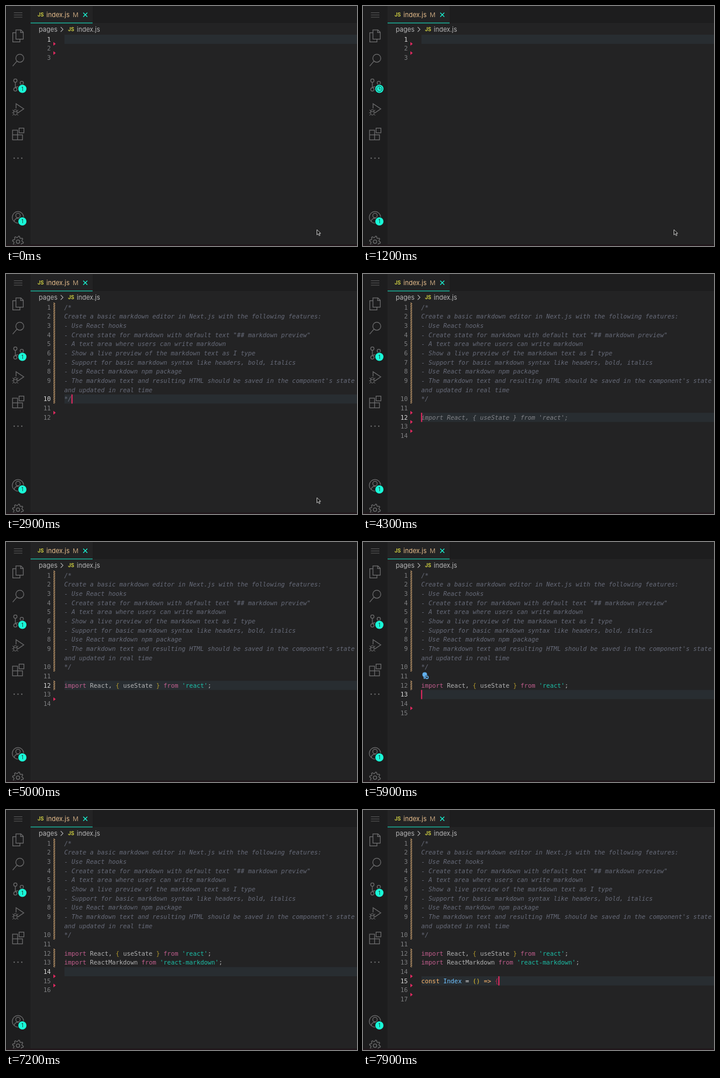
Animation, 600 px wide and 410 px high, one loop 8 s. Source, as an HTML page with a canvas:

```html
<!DOCTYPE html>
<html lang="en">
<head>
<meta charset="utf-8">
<title>Code editor</title>
<style>
html, body { margin: 0; width: 100%; height: 100%; overflow: hidden; background: #232324; }
canvas { display: block; width: 600px; height: 410px; }
</style>
</head>
<body>
<canvas id="stage"></canvas>
<script>
const W = 600, H = 410, LOOP = 8000, BLINK = 305;
const TOP = 49, ROW = 15.67, LEFT = 99.5, CHAR = 6.29;
const MONO = '10.45px "DejaVu Sans Mono", "Liberation Mono", monospace';
const UI = 'Inter, "Open Sans", sans-serif';
const C = {
  editor: '#232324', side: '#1d1d1e', current: '#282d31', teal: '#19f9d8',
  pink: '#ff75b5', blue: '#6fc1ff', orange: '#ffb86c', gold: '#e8c52e',
  text: '#e6e6e6', comment: '#676b79', ghost: '#808287', red: '#e02a60',
  icon: '#6c6c6d', peach: '#e6bd8c', error: '#b82450'
};

const comment = [
  '/*',
  'Create a basic markdown editor in Next.js with the following features:',
  '- Use React hooks',
  '- Create state for markdown with default text "## markdown preview"',
  '- A text area where users can write markdown',
  '- Show a live preview of the markdown text as I type',
  '- Support for basic markdown syntax like headers, bold, italics',
  '- Use React markdown npm package',
  "- The markdown text and resulting HTML should be saved in the component's state",
  'and updated in real time',
  '*/'
];
const code = {
  12: [['pink', 'import'], ['text', ' React, '], ['gold', '{'], ['text', ' useState '], ['gold', '}'],
    ['pink', ' from '], ['teal', "'react'"], ['text', ';']],
  13: [['pink', 'import'], ['text', ' ReactMarkdown '], ['pink', 'from '], ['teal', "'react-markdown'"], ['text', ';']],
  15: [['orange', 'const '], ['blue', 'Index'], ['text', ' = '], ['gold', '()'], ['orange', ' => '], ['error', '{']]
};

// Each step overrides part of the state; "key" restarts the caret blink.
const steps = [
  [0, { line: 1, col: 0, key: 90, done: 0, ghost: 0, faded: 0, marks: [1, 2], bars: [], mouse: true }],
  [1000, { clock: true }],
  [1385, { line: 10, col: 2, key: 1385, done: 10, marks: [10, 11] }],
  [1500, { bars: [[1, 10]], marks: [11] }],
  [1700, { clock: false }],
  [3000, { line: 11, col: 0, key: 3000, marks: [11, 12], mouse: false }],
  [3500, { line: 12, key: 3500, marks: [11, 12, 13] }],
  [3750, { ghost: 12 }],
  [4500, { ghost: 0, done: 12, col: 40, key: 4500 }],
  [4700, { bars: [[1, 10], [12, 12]], marks: [13] }],
  [4900, { faded: 12 }],
  [5200, { line: 13, col: 0, key: 5200, marks: [14] }],
  [5500, { bulb: true }],
  [6000, { bulb: false }],
  [6100, { ghost: 13 }],
  [6300, { ghost: 0, done: 13, col: 43, key: 6300 }],
  [6450, { bars: [[1, 10], [12, 13]] }],
  [6700, { faded: 13 }],
  [6850, { line: 14, col: 0, key: 6850, marks: [14, 15] }],
  [7300, { line: 15, key: 7300, marks: [14, 15, 16] }],
  [7500, { ghost: 15 }],
  [7800, { ghost: 0, done: 15, col: 21, key: 7800 }]
];

const canvas = document.getElementById('stage');
const g = canvas.getContext('2d');
const dpr = window.devicePixelRatio || 1;
canvas.width = W * dpr;
canvas.height = H * dpr;

function stateAt(t) {
  const s = {};
  for (const [at, change] of steps) if (t >= at) Object.assign(s, change);
  return s;
}

function rect(x, y, w, h, color) {
  g.fillStyle = color;
  g.fillRect(x, y, w, h);
}

function write(str, x, y, font, color, align = 'left') {
  g.font = font;
  g.fillStyle = color;
  g.textAlign = align;
  g.fillText(str, x, y);
}

function stroke(d, color = C.icon, width = 1.25) {
  g.strokeStyle = color;
  g.lineWidth = width;
  g.stroke(new Path2D(d));
}

function disc(x, y, r, color) {
  g.fillStyle = color;
  g.beginPath();
  g.arc(x, y, r, 0, 7);
  g.fill();
}

function ring(x, y, r, color = C.icon, width = 1.25) {
  g.strokeStyle = color;
  g.lineWidth = width;
  g.beginPath();
  g.arc(x, y, r, 0, 7);
  g.stroke();
}

// Line 9 wraps, so everything below it sits one row lower.
const rowTop = line => TOP + (line < 10 ? line - 1 : line) * ROW;

function badge(y, clock) {
  disc(28, y, 8, C.side);
  disc(28, y, 7, C.teal);
  if (clock) {
    ring(28, y, 4.6, '#174a44', 1);
    stroke(`M28 ${y - 3}V${y + .3}H30.6`, '#174a44', 1);
  } else write('1', 28, y + 3, '8.5px ' + UI, '#20302f', 'center');
}

function gear(x, y) {
  g.beginPath();
  for (let i = 0; i < 32; i++) {
    const a = (i + .5) * Math.PI / 16;
    const r = i % 4 < 2 ? 9.3 : 7;
    g.lineTo(x + r * Math.cos(a), y + r * Math.sin(a));
  }
  g.closePath();
  g.strokeStyle = C.icon;
  g.lineWidth = 1.25;
  g.stroke();
  ring(x, y, 3);
}

function sidebar(s) {
  rect(0, 0, 42, H, C.side);
  rect(0, 0, 1, H, '#161617');
  stroke('M13.5 11.5H28M13.5 15.3H28M13.5 19.1H28', '#59595a', 1);
  stroke('M17 40.8H25.5L29.5 44.8V56.5H17ZM25 41V45.3H29.3M17 45.5H11.6V61.3H23.8V56.7');
  ring(23.6, 89.2, 6.8);
  stroke('M18.8 94.2L11.5 102.6');
  ring(16, 127.5, 2.8);
  ring(16, 142.5, 2.8);
  ring(27, 131.3, 2.8);
  stroke('M16 130.5V139.5M27 134.3Q26.5 138 22 138H19Q16 138 16 140');
  badge(141.5, s.clock);
  stroke('M17.2 175V167L30.4 175.8L20.8 182.3');
  stroke('M13 180.5Q13 177 16 177T19 180.5V183Q19 186.3 16 186.3T13 183ZM13 180.5H19M11 177.5L13.2 179.5M21 177.5L18.8 179.5M10.5 182.5H13M19 182.5H21.5M11 187L13.3 184.8M21 187L18.7 184.8', C.icon, 1);
  stroke('M11.2 212H19.8V228.6H11.2ZM11.2 220.2H28.2V228.6H19.8M28.2 220.2V228.6M22.4 208.6H30.6V216.6H22.4Z');
  for (const x of [14, 20.5, 27]) disc(x, 260, 1.15, C.icon);
  ring(20.5, 361, 9.8);
  ring(20.5, 358, 3.8);
  stroke('M14 368Q15 362.6 20.5 362.6T27 368');
  badge(368, false);
  gear(20.5, 402.5);
}

function header() {
  rect(42, 0, 558, 29, C.side);
  rect(42, 0, 106, 29, C.editor);
  rect(42, 28.4, 106, 1.2, '#18c9af');
  const ui = '11px ' + UI, js = 'bold 8.5px ' + UI;
  write('JS', 54, 18, js, '#cbcb41');
  write('index.js', 69, 19, ui, C.peach);
  write('M', 114, 19, ui, '#b89a77');
  stroke('M132 11.5L139 18.5M139 11.5L132 18.5', C.teal, 1.1);
  write('pages', 56, 44, ui, '#b5b5b6');
  stroke('M93.5 36L97.5 40L93.5 44', '#a5a5a6', 1.1);
  write('JS', 106, 43, js, '#cbcb41');
  write('index.js', 121, 44, ui, '#b5b5b6');
}

function gutter(s) {
  for (let n = 1; n <= s.line + 2; n++) {
    // Wrapping only exists once the comment is in place.
    write(n, 76.6, rowTop(n) + 11.7, MONO, n === s.line ? '#d8d8d8' : '#7d7e80', 'right');
  }
  for (const [from, to] of s.bars) {
    const y = rowTop(from), end = rowTop(to + 1);
    g.save();
    g.beginPath();
    g.rect(81, y, 3, end - y);
    g.clip();
    g.strokeStyle = '#dcae78';
    g.lineWidth = 1.2;
    g.beginPath();
    for (let v = y - 4; v < end; v += 3) {
      g.moveTo(80, v);
      g.lineTo(85, v + 4);
    }
    g.stroke();
    g.restore();
  }
  g.fillStyle = C.red;
  for (const n of s.marks) {
    const y = rowTop(n + 1);
    g.fill(new Path2D(`M81 ${y - 3.2}L85 ${y}L81 ${y + 3.2}Z`));
  }
}

function codeLine(n, s) {
  let x = LEFT;
  const y = rowTop(n) + 11.7;
  g.globalAlpha = n <= s.faded ? .72 : 1;
  for (const [color, str] of code[n]) {
    write(str, x, y, MONO, C[color]);
    x += str.length * CHAR;
  }
  g.globalAlpha = 1;
}

function lightbulb() {
  disc(105.5, 226.6, 4, '#62b0ee');
  rect(103.7, 229, 3.6, 4.6, '#62b0ee');
  disc(109.3, 231.3, 3.6, C.editor);
  ring(109.3, 231.3, 2.2, '#62b0ee', 1.5);
}

function pointer(x, y) {
  const d = `M${x} ${y}V${y + 9}L${x + 2.2} ${y + 7}L${x + 3.8} ${y + 10.4}L${x + 5.3} ${y + 9.7}L${x + 3.8} ${y + 6.4}H${x + 6.4}Z`;
  g.fillStyle = '#111';
  g.fill(new Path2D(d));
  stroke(d, '#d5d5d5', .9);
}

function draw(t) {
  const s = stateAt(t);
  g.setTransform(dpr, 0, 0, dpr, 0, 0);
  rect(0, 0, W, H, C.editor);
  header();
  sidebar(s);
  rect(100, rowTop(s.line), 500, ROW, C.current);
  gutter(s);

  if (s.done) {
    comment.forEach((str, i) => write(str, LEFT, TOP + i * ROW + 11.7, 'italic ' + MONO, C.comment));
  }
  for (const n of [12, 13, 15]) {
    if (n <= s.done) codeLine(n, s);
    else if (n === s.ghost) {
      const str = code[n].map(part => part[1]).join('');
      write(str, LEFT, rowTop(n) + 11.7, 'italic ' + MONO, C.ghost);
    }
  }
  if (s.bulb) lightbulb();
  if (!(Math.floor((t - s.key) / BLINK) & 1)) {
    rect(LEFT - .3 + s.col * CHAR, rowTop(s.line), 2, ROW, C.red);
  }
  rect(0, 407.5, W, 2.5, '#21171b');
  if (s.mouse) pointer(531.5, 382);
}

const start = performance.now();
function frame() {
  draw((performance.now() - start) % LOOP);
  requestAnimationFrame(frame);
}
draw(0);
requestAnimationFrame(frame);
</script>
</body>
</html>
```
